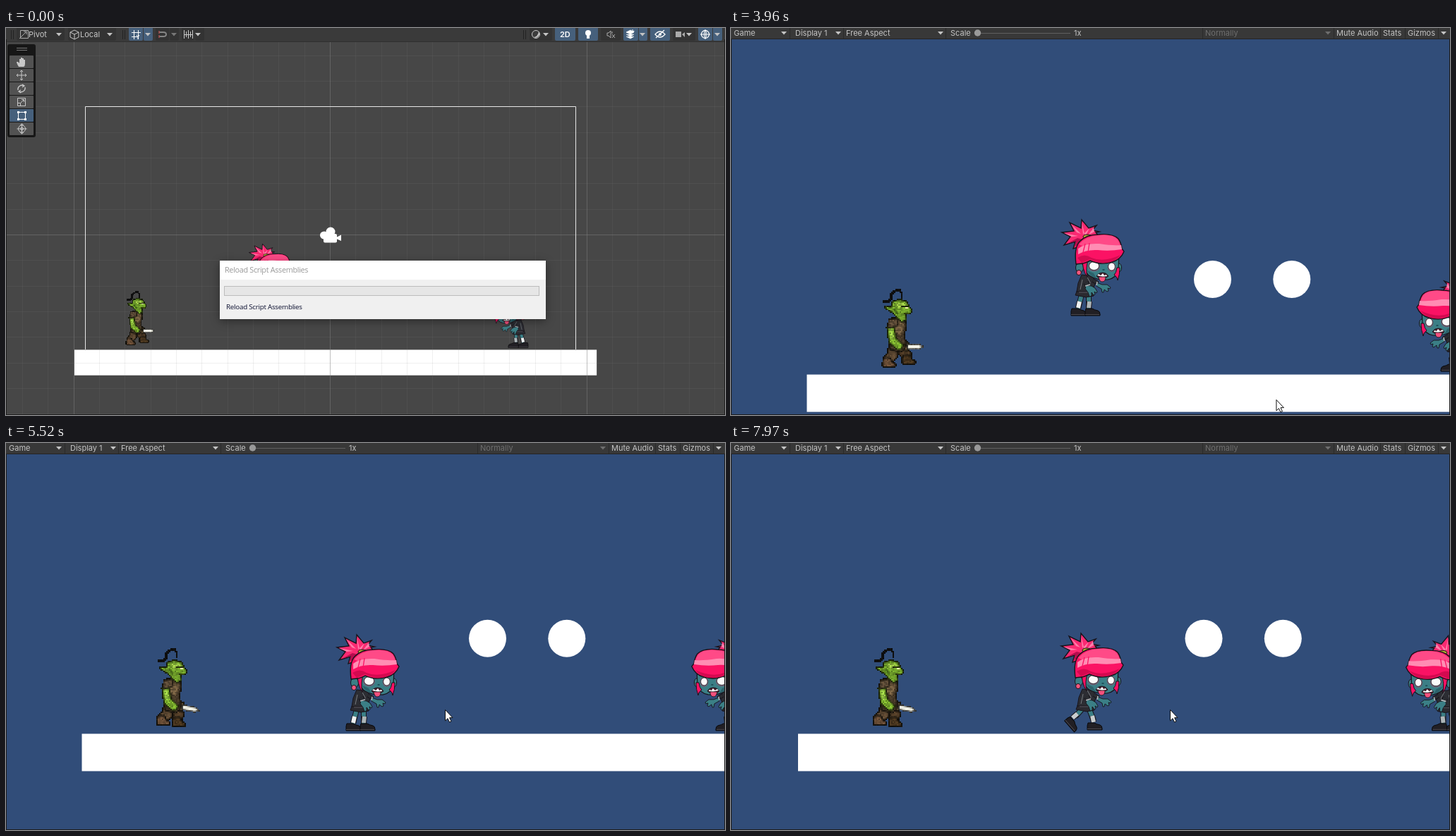
Write an HTML page with a canvas that moves like this. It is 1019 px wide and 549 px high and loops after 8000 ms.

```html
<!DOCTYPE html>
<html lang="en">
<head>
<meta charset="utf-8">
<title>Scene preview</title>
<style>
html, body { margin: 0; width: 100%; height: 100%; overflow: hidden; background: #474747; }
canvas { display: block; }
</style>
</head>
<body>
<canvas id="stage" width="1019" height="549"></canvas>
<script>
const LOOP = 8000;
const cv = document.getElementById('stage');
const main = cv.getContext('2d');
let g = main;

// ---- helpers ----
const clamp = v => Math.max(0, Math.min(1, v));
function rect(x, y, w, h, fill) { g.fillStyle = fill; g.fillRect(x, y, w, h); }
function shape(d, fill, stroke, width = 1) {
  const p = new Path2D(d);
  if (fill) { g.fillStyle = fill; g.fill(p); }
  if (stroke) { g.strokeStyle = stroke; g.lineWidth = width; g.stroke(p); }
}
function oval(x, y, rx, ry, fill, stroke, width = 1) {
  g.beginPath();
  g.ellipse(x, y, rx, ry, 0, 0, Math.PI * 2);
  if (fill) { g.fillStyle = fill; g.fill(); }
  if (stroke) { g.strokeStyle = stroke; g.lineWidth = width; g.stroke(); }
}
function box(x, y, w, h, r, fill) {
  g.beginPath(); g.roundRect(x, y, w, h, r); g.fillStyle = fill; g.fill();
}
function text(s, x, y, fill, font = '11px Inter, sans-serif', spacing = 0) {
  g.font = font;
  g.letterSpacing = spacing + 'px';
  g.fillStyle = fill;
  g.fillText(s, x, y);
}
const arrow = (x, y, fill = '#c4c4c4') => shape(`M${x - 4} ${y - 2}h8l-4 4.5z`, fill);
function at(x, y, draw) { g.save(); g.translate(x, y); draw(); g.restore(); }

// ---- goblin: four walk poses on a coarse pixel grid ----
const POSES = [
  { head: 0, top: 0, back: [4, 53], front: [18, 51], knife: [17, 41, 0, 13] },
  { head: 2, top: 0, back: [3.5, 53], front: [22, 53], knife: [20, 40.5, 0, 10] },
  { head: 1, top: 0, back: [7, 52], front: [18, 53], knife: [18, 41, 0.1, 11] },
  { head: 0, top: 1, back: [3.5, 52], front: [14.5, 53], knife: [17, 41.5, 0.2, 14] }
];
const EDGE = '#15120c';
function leg(hip, foot, cloth, boot) {
  const [x, y] = foot, knee = (hip + x) / 2 + 2;
  const d = `M${hip} 42L${knee} 47L${x} ${y - 2}`;
  shape(d, null, EDGE, 8);
  shape(d, null, cloth, 6);
  shape(`M${x - 2.500} ${y - 4}h5l1 3 2.500 1v2.500h-9v-4z`, boot, EDGE);
}
function goblinSprite(p) {
  const c = document.createElement('canvas');
  c.width = 32; c.height = 58;
  const old = g;
  g = c.getContext('2d');
  leg(8.5, p.back, '#604a33', '#6f5138');
  leg(13.5, p.front, '#564029', '#4b371f');
  const [kx, ky, turn, len] = p.knife;
  at(kx, ky, () => {
    g.rotate(turn);
    shape('M-1 -3h3v6h-3z', '#6d5836', EDGE);
    shape(`M1.500 -1.600h${len - 5}l3.500 1.600-3.500 1.700h-${len - 5}z`, '#f2f2e6', '#1a1a1a', .7);
  });
  at(p.head * .5, p.top, () => {
    shape('M6.500 21L16 21 18 26 16.500 32 17.500 41 14 45 6 43 6 34 4 27z', '#4d3e2b', EDGE);
    shape('M11 23L16 25 14 33 9 30z', '#7a6344');
    shape('M6 39h11v2h-11z', '#2a2015');
    shape('M4 27L9 27 10.500 35 15.500 40 14 43 11 43 5.500 38z', '#80b42f', '#182008');
    shape('M5.500 28h2l1.500 7-2 1z', '#9dce49');
    shape('M5 22L11 21 12 26 5 28z', '#63503a', EDGE, .7);
  });
  shape(`M1 9h4l2-2v-3l2-2 2-1h${2 + p.head}l1.500 2v4`, null, '#101010', 1.7);
  at(p.head, p.top, () => {
    shape('M8 9L13 7.500 18 9 20 13 22 15 21 17.500 17.500 18 18 22 14.500 23.500 10.500 20 8 17 3 14 2.500 12 7 13z', '#76a82c', '#141a08');
    shape('M10 10h6l2 2-6 2z', '#a2cf48');
    shape('M14 12h5v1h-5z', '#202a0c');
    rect(17, 13, 2, 1, '#f2efb0');
    shape('M16 17h4v1h-4z', '#35470f');
    shape('M8 14h3l1 4-2 0z', '#55801f');
  });
  const img = g.getImageData(0, 0, 32, 58);
  let seed = 7;
  for (let i = 0; i < img.data.length; i += 4) {
    seed = (seed * 1103515245 + 12345) % 2147483648;
    const k = 0.72 + 0.42 * seed / 2147483648;
    img.data[i + 3] = img.data[i + 3] > 115 ? 255 : 0;
    if (img.data[i] < 215) for (let n = 0; n < 3; n++) img.data[i + n] *= k;
  }
  g.putImageData(img, 0, 0);
  g = old;
  return c;
}
const goblins = POSES.map(goblinSprite);

// ---- zombie girl ----
const INK = '#17131a', SKIN = '#3b7f86', PINK = '#fb1264';
function shoe(x, y, turn) {
  at(x, y, () => {
    g.rotate(turn);
    shape('M-9 -9h9q3 2 8 3q3 1 3 5l0 2h-21v-6z', '#211f24', '#08080a');
    shape('M-10 -.5h20', null, '#4a474d', 1);
  });
}
function limb(d, width, fill) { shape(d, null, INK, width + 2); shape(d, null, fill, width); }
function girl(sway, walking) {
  if (walking) {
    limb('M497 378L488 388', 6, SKIN);
    limb('M491 384L484 390', 6, '#c9cdcf');
    shoe(480, 401, .85);
    limb('M508 378L514 394', 6, SKIN);
    limb('M512 387L514 396', 6, '#c9cdcf');
    shoe(515, 406, 0);
  } else {
    limb('M497 378L492 398', 6, SKIN);
    limb('M494 388L492 397', 6, '#eef0f0');
    shoe(492, 407, 0);
    limb('M507 378L507 398', 6, SKIN);
    limb('M508 388L507 397', 6, '#aeb6b8');
    shoe(512, 407, 0);
  }
  at(walking ? 1 : sway * 1.5, walking ? -1 : sway, () => {
    shape('M491 371L512 371 514 380 503 382 488 379z', '#2b2a30', INK);
    shape('M497 350L513 352 516 363 512 374 490 374 492 362z', '#2c2d33', INK);
    shape('M504 352l5 9-2 12M498 357l-3 14', null, '#777b80', 1);
    shape('M493 375h18', null, '#5a5960', 1);
    limb('M513 358L520 362', 4, '#2b2d32');
    shape('M518 361l8 3 7 0 5 4-1 2-3-1 1 4-2 1-4-3-1 4-2 0-1-5-7-4z', SKIN, INK, .9);
    shape('M519 360l-1 5', null, '#b7bdc0', 1.6);
    limb('M503 361L506 366', 6, '#2b2d32');
    shape('M503 365l8 1 5 3 3 5-1 2-3-2 1 4-2 1-3-4 0 5-3 1-2-6-4-5z', SKIN, INK, .9);
    shape('M502 366l7-2', null, '#b7bdc0', 1.6);
  });
  at(walking ? -1 : sway * 4, walking ? -2 : sway * 2, () => {
    shape('M521 295L517 290 522 289 512 287 518 280 507 284 497 272 496 284 480 276 486 288 469 290 481 296 472 308 488 303 485 313 507 306z', '#fa2a72', INK, 1.4);
    shape('M497 275l2 18 9-9-6 12zM482 278l14 14-6-2zM472 291l20 4-9 1zM514 283l-8 11 9-5z', '#ff7eaa');
    shape('M476 306l15-8 8 2-12 11 2-9z', '#b60d4e');
    oval(494, 340, 5.5, 7, SKIN, INK);
    oval(550, 340, 3.5, 6, SKIN, INK);
    oval(493, 347, 3.4, 3.6, '#f4577f', INK);
    shape('M501 322Q498 346 509 352Q519 358 534 357Q546 355 549 343L550 318z', SKIN, INK, 1.2);
    shape('M505 344Q508 352 518 355L514 348z', '#2c626b');
    oval(514.5, 338, 8.5, 7.5, '#6f6176');
    oval(514.5, 337.5, 7, 6, '#fbfbfb', INK, .8);
    oval(539.5, 339, 6, 7, '#6f6176');
    oval(539.5, 338.5, 4.8, 5.5, '#fbfbfb', INK, .8);
    oval(528, 343, 1.8, 1, '#1f5058');
    shape('M518 352Q521 347 527 347Q532 347 535 352L532 354 520 354z', '#41202d', INK, .8);
    shape('M519 351l2-2 3 2 3-3 2 3 3-1 1 2-6 1z', '#fff');
    shape('M521 353h10q0 7-5 7q-4 0-5-7z', '#f4517d', INK, .8);
    shape('M498 323L507 325Q502 341 505 354Q497 342 498 323z', PINK, INK);
    shape('M543 350q3-2 4-10l4 0q0 10-3 18q0-4-5-8z', PINK, INK);
    oval(505, 296, 6, 3, '#b7ad32', INK);
    shape('M489 335Q486 312 494 303Q503 293 521 293Q541 291 549 299Q553 305 554 313L557 317Q552 329 540 332Q524 337 509 330Q501 334 498 334z', PINK, INK, 1.4);
    shape('M493 307Q503 295 521 294Q541 292 548 300Q551 304 552 309Q525 307 503 311z', '#ff4a87');
    shape('M492 313Q501 305 522 306Q540 309 553 308L554 314Q536 317 520 315Q503 314 492 321z', '#ff8db3');
    shape('M491 326Q501 319 511 326Q528 333 552 322Q545 331 533 333Q520 334 509 328Q500 332 497 333z', '#d40a50');
    shape('M502 306l-3 12M508 305l-2 13', null, PINK, 1.3);
  });
}

// ---- world, in play-view pixels ----
function ground(dx, dy) { rect(107.5 + dx, 491.6 + dy, 1081.5, 53, '#fff'); }
function actors(dx, dy, sway, step, walking) {
  for (const x of [682.5, 794.8]) oval(x + dx, 356.4 + dy, 26.5, 26.5, '#fff');
  g.imageSmoothingEnabled = false;
  g.drawImage(goblins[step], 213 + dx, 370 + dy, 64, 116);
  girl(walking ? 0 : sway, walking);
  at(1529 + dx, 79 + dy, () => { g.scale(-1, 1); girl(sway, false); });
}

// ---- editor view ----
const BLUE = '#46607c', DARK = '#333', ICON = '#c8c8c8';
const GRID = 36.35, MIDX = 459.5, MIDY = 293.5;
function grid() {
  for (let k = -13; k <= 16; k++) {
    const wide = k % 10 === 0;
    const tone = `rgba(128,128,128,${wide ? .5 : .13})`;
    rect(Math.floor(MIDX + k * GRID), 20, 1, 529, tone);
    if (Math.abs(k) < 8) rect(1, Math.floor(MIDY + k * GRID), 1017, 1, tone);
  }
}
function handle(x) { rect(x, 3, 1, 13, '#232323'); rect(x + 3, 3, 1, 13, '#232323'); }
function topBar() {
  rect(0, 0, 1019, 19, '#3a3a3a');
  rect(0, 19, 1019, 1, '#303030');
  [7, 165, 733].forEach(handle);
  const buttons = [[15, 68], [88, 68], [174, 20, 1], [195, 13, 1], [212, 19], [232, 13], [249, 18], [268, 13],
    [742, 32], [778, 29, 1], [811, 28, 1], [843, 28], [875, 21, 1], [897, 12, 1], [913, 28, 1], [945, 32], [981, 20, 1], [1002, 13, 1]];
  for (const [x, w, on] of buttons) box(x, 0, w, 18, [0, 0, 2, 2], on ? BLUE : DARK);
  [75, 147, 201, 272, 765, 902, 968, 1008].forEach(x => arrow(x, 9));
  arrow(238, 9, '#777');
  text('Pivot', 32, 13, ICON);
  text('Local', 105, 13, ICON);
  shape('M20.5 3.5h11v11h-11zM19 15l10-10M25 5h4v4', null, '#aaa');
  shape('M97 3l6 3v7l-6 3-6-3v-7zM91 6l6 3 6-3M97 9v7', null, ICON);
  shape('M181.500 3v13M187.500 3v13M178 6.500h13M178 12.500h8', null, '#fff');
  shape('M185 10l2 3 2-3M187 13v3', null, '#fff');
  shape('M217 6h6M217 12h6M223 6q4 0 4 3t-4 3', null, '#858585', 2);
  shape('M217 4v4M217 10v4', null, '#a14c4c', 1.5);
  shape('M252.500 3v12M264.500 3v12M255.500 5v8M258.500 3v12M261.500 5v8M253 9.500h11', null, ICON);
  oval(751, 9, 5.5, 5.5, '#3c3c3c', ICON);
  shape('M755 5a5.500 5.500 0 0 1-7 8q6-1 7-8z', ICON);
  text('2D', 785, 13, '#fff', '600 11px Inter, sans-serif');
  oval(825, 7, 4, 4, '#fff');
  rect(823, 10, 4, 5, '#fff');
  shape('M852 7h2l3-3v10l-3-3h-2zM859 9l4 5M863 9l-4 5M859 5v3', null, '#aaa');
  shape('M879 6l6-3 5 3-5 3zM879 9l6 3 5-3M879 12l6 3 5-3', '#fff', '#fff', .8);
  shape('M888 2v5M885.500 4.500h5', null, '#fff');
  shape('M920 9q7-8 14 0q-7 8-14 0zM921 14l12-11', null, '#fff', 1.3);
  oval(927, 9, 2, 2, '#fff');
  shape('M949 5h8v8h-8zM958 9l4-3v7z', '#aaa');
  oval(991, 9, 5.5, 5.5, null, '#fff', 1.3);
  shape('M984 9h14M991 2v14', null, '#fff');
  oval(991, 9, 2, 5, null, '#fff', .8);
}
function toolPanel() {
  box(2, 23, 40, 132, 3, '#171717');
  rect(15, 28, 15, 1, '#777');
  rect(15, 31, 15, 1, '#777');
  for (let i = 0; i < 6; i++) box(5, 39 + i * 19, 34, 18, 1, i === 4 ? BLUE : '#525252');
  shape('M18 55q-3-5-3-7l2 0 2 2v-6h2v4-6h2v6-5h2v5-3h2v6q0 3-2 4z', ICON);
  shape('M22 61v12M16 67h12M20 62l2-2 2 2M20 72l2 2 2-2M17 65l-2 2 2 2M27 65l2 2-2 2', null, ICON);
  shape('M17 88a5.500 5.500 0 0 1 8-6M27 84a5.500 5.500 0 0 1-8 6M23 80l3 2-3 2M21 92l-3-2 3-2', null, ICON, 1.3);
  shape('M16.500 99.500h11v11h-11zM16.500 106.500h4v4M21 106l4-4M22 101.500h3.500v3.500', null, ICON);
  shape('M17.500 119.500h10v10h-10z', null, '#fff');
  for (const x of [16, 26]) for (const y of [118, 128]) rect(x, y, 3, 3, '#fff');
  oval(22.5, 143, 5, 5, null, ICON);
  shape('M22.500 136v14M15.500 143h14M20 138l2.500-2 2.500 2M20 148l2.500 2 2.500-2', null, ICON);
  oval(22.5, 143, 2, 2, null, ICON);
}
function cameraIcon() {
  oval(451, 294, 6, 5.5, '#fff');
  oval(460, 289, 6.5, 6.5, '#fff');
  box(450, 292, 19, 12.5, 2, '#fff');
  shape('M468 297l7-3.500v8.500l-7-3z', '#fff');
}
function dialog(t) {
  const fade = clamp((t - 1450) / 170);
  if (fade >= 1) return;
  const label = t < 1240 ? 'Reload Script Assemblies' : 'Completing Domain';
  g.save();
  g.globalAlpha = 1 - fade;
  g.translate(534, 371);
  g.scale(1 - fade * .08, 1 - fade * .08);
  g.translate(-534, -371);
  g.shadowColor = 'rgba(0,0,0,.4)';
  g.shadowBlur = 12;
  g.shadowOffsetY = 3;
  rect(303, 330, 462, 83, '#f0f0f0');
  g.shadowColor = 'transparent';
  rect(303, 330, 462, 27, '#fff');
  rect(309, 366, 447, 14, '#bcbcbc');
  rect(310, 367, 445, 12, '#e6e6e6');
  text(label, 310, 347, '#999', '10.8px "Open Sans", sans-serif', -.3);
  text(label, 312, 399, '#0c1030', '9.8px "Open Sans", sans-serif', -.25);
  g.restore();
}
function editor(t) {
  rect(0, 0, 1019, 549, '#474747');
  const world = draw => at(23.4, 120, () => { g.scale(.6844, .6844); draw(); });
  world(() => ground(0, 0));
  grid();
  shape('M112.500 456V111.500H807.500V456', null, '#e6e6e6');
  world(() => actors(0, 0, 0, 0, false));
  cameraIcon();
  topBar();
  toolPanel();
  dialog(t);
  frameEdge();
}
function frameEdge() {
  rect(0, 16, 1, 533, '#1c1c1c');
  rect(1018, 16, 1, 533, '#1c1c1c');
  rect(0, 548, 1019, 1, '#1c1c1c');
}

// ---- play view ----
function playBar() {
  rect(0, 0, 1019, 16, '#383838');
  rect(0, 15, 1019, 1, '#242424');
  for (const x of [83, 159, 304, 668, 854, 920, 955, 1002]) rect(x, 0, 1, 15, '#2a2a2a');
  const labels = { 'Game': 4, 'Display 1': 91, 'Free Aspect': 163, 'Scale': 311, '1x': 486, 'Mute Audio': 858, 'Stats': 924, 'Gizmos': 959 };
  for (const s in labels) text(s, labels[s], 11, '#c4c4c4');
  text('Normally', 672, 11, '#6e6e6e');
  [75, 152, 297, 1010].forEach(x => arrow(x, 7));
  arrow(846, 7, '#6e6e6e');
  rect(350, 7, 131, 1, '#606060');
  oval(349.5, 7, 4.7, 4.7, '#999');
}
function lift(t) {
  if (t < 4550) return 0;
  if (t < 4980) return -82 * ((t - 4530) / 450) ** 2;
  if (t < 5030) return -82 + 4 * (t - 4980) / 50;
  return -78 - 1.1 * clamp((t - 5060) / 300);
}
function pointer(t) {
  if (t < 3960) return;
  const k = 1 - (1 - clamp((t - 3960) / 210)) ** 1.5;
  at(773.5 - 151.5 * k, 528 - 150 * k, () =>
    shape('M.5 .5v15.500l3.500-3.300 2.500 5.300 2.500-1-2.400-5.300h4.400z', '#fff', '#111'));
}
function play(t) {
  rect(0, 0, 1019, 549, '#314d79');
  const run = Math.max(0, t - 4550);
  const walking = t >= 6995;
  const dx = walking ? -.0128 * (t - 6995) : 0;
  const dy = lift(t);
  const sway = (1 - Math.cos(run / 930 * Math.PI * 2)) / 2;
  ground(dx, dy);
  actors(dx, dy, sway, Math.floor(run / 125) % 4, walking);
  playBar();
  frameEdge();
  pointer(t);
}

const start = performance.now();
function tick() {
  const t = (performance.now() - start) % LOOP;
  if (t < 1960) editor(t); else play(t);
  requestAnimationFrame(tick);
}
tick();
</script>
</body>
</html>
```
